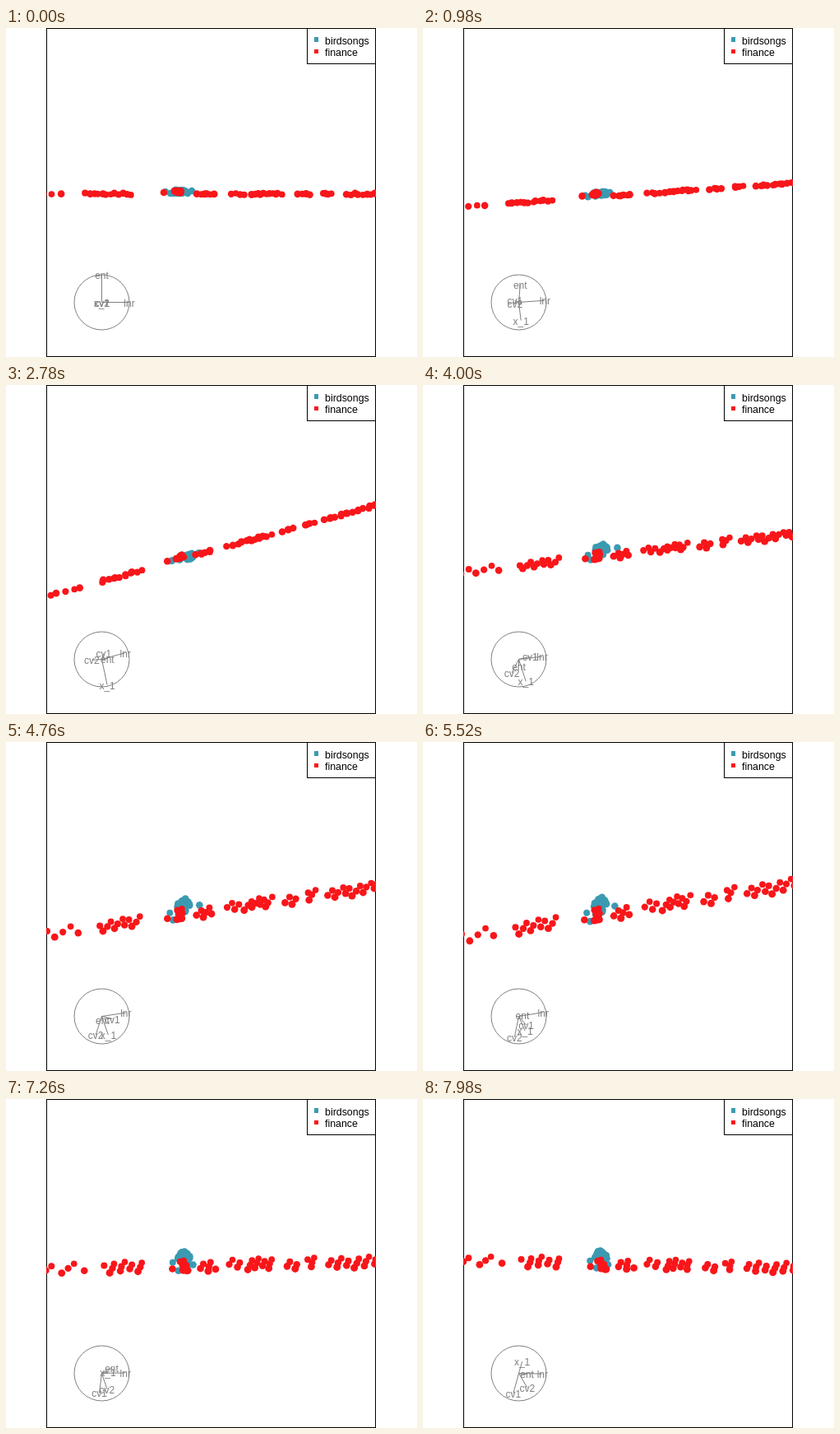
An HTML page with a canvas that plays this animation: 500 px wide and 400 px high, repeating every 8 s.

```html
<!DOCTYPE html>
<html lang="en">
<head>
<meta charset="utf-8">
<title>Projection tour</title>
<style>
  html, body { margin: 0; width: 100%; height: 100%; overflow: hidden; background: #fff; }
  canvas { display: block; }
</style>
</head>
<body>
<canvas id="stage" width="500" height="400"></canvas>
<script>
const ctx = document.getElementById('stage').getContext('2d');
const LOOP = 8000, STEP = 20;
const BLUE = '#3b9ab2', RED = '#f8161a', GREY = '#7f7f7f';
const FONT = '"Liberation Sans", Arial, sans-serif';
const LABELS = ['lnr', 'ent', 'x_1', 'cv1', 'cv2'];

// Evenly timed key projections: the horizontal and the vertical direction in LABELS order.
const POSES = [
  { h: [1, 0, 0, 0, 0], v: [0, 1, 0, 0, 0] },
  { h: [.93, .08, .11, -.16, -.19], v: [.1, .5, -.85, .09, -.04] },
  { h: [.86, .21, .19, .04, -.36], v: [.24, .06, -.93, .21, 0] },
  { h: [.85, 0, .26, .41, -.25], v: [.1, -.24, -.8, .09, -.49] },
  { h: [.89, .1, .22, .3, -.18], v: [.15, -.01, -.56, -.26, -.75] },
  { h: [.86, .37, .29, .03, .07], v: [.06, .31, -.3, -.64, -.62] },
  { h: [.86, .3, .12, -.2, .31], v: [-.02, -.03, .43, -.73, -.52] }
];

// Stretches of the red line: start, end, number of points.
const STRETCHES = [
  [-237, -183, 6], [-153, -98, 12], [-17, 3, 6], [24, 40, 4],
  [49, 85, 11], [105, 120, 4], [135, 145, 4], [164, 238, 16]
];

let seed = 11;
function random(low, high) {
  seed = (seed * 16807) % 2147483647;
  return low + (high - low) * seed / 2147483647;
}

const points = [];
function addPoint(color, radius, lnr, cv2, ent, x1, cv1 = -4 + cv2 / 4) {
  points.push({ color, radius, values: [lnr, ent, x1, cv1, cv2] });
}

// Blue group: an arch, its filling, and three outliers.
for (let i = 0; i <= 13; i++) {
  const u = i / 13;
  addPoint(BLUE, 4.3, -46 + 17 * u, -6 - 10 * Math.sin(Math.PI * u), random(-1, 4), random(-5, 3));
}
for (let i = 0; i < 10; i++) {
  addPoint(BLUE, 4.3, random(-46, -34), random(-9, 8), random(-1, 3), random(-3, 3));
}
addPoint(BLUE, 4, -56, 1, 1, 0);
addPoint(BLUE, 4.3, -50, 14, -1, 1);
addPoint(BLUE, 4.3, -24, -10, 2, 1, 10);

// Red points: the long line, its depth spread by the golden ratio, and a dense cluster.
const redRadius = cv2 => 3.9 + cv2 * .04;
let index = 0;
for (const [from, to, count] of STRETCHES) {
  for (let i = 0; i < count; i++) {
    const cv2 = -3 + 19 * (++index * .618 % 1);
    const lnr = from + (to - from) * i / (count - 1) + random(-1, 1);
    addPoint(RED, redRadius(cv2), lnr, cv2, random(-3, -.6), random(1, 3));
  }
}
for (let i = 0; i < 15; i++) {
  const cv2 = random(-2, 15);
  addPoint(RED, redRadius(cv2), random(-46, -33), cv2, random(-.5, 2.5), random(-4, 1));
}
addPoint(RED, 4.3, -58, 11, 0, 0);

// Uniform Catmull-Rom curve through p1 and p2.
function spline(p0, p1, p2, p3, u) {
  return p1 + u / 2 * (p2 - p0 + u * (2 * p0 - 5 * p1 + 4 * p2 - p3 + u * (3 * (p1 - p2) + p3 - p0)));
}

function basisAt(time) {
  const last = POSES.length - 1;
  const position = time / LOOP * last, i = Math.floor(position);
  const around = [i - 1, i, i + 1, i + 2].map(k => POSES[Math.max(0, Math.min(last, k))]);
  const blend = side => LABELS.map((_, k) => spline(...around.map(pose => pose[side][k]), position - i));
  return { h: blend('h'), v: blend('v') };
}

function text(label, x, y, size, color, align) {
  ctx.font = `${size}px ${FONT}`;
  ctx.textAlign = align;
  ctx.fillStyle = color;
  ctx.fillText(label, x, y);
}

function drawLegend() {
  ctx.strokeStyle = '#000';
  ctx.strokeRect(366.5, .5, 83, 43);
  ctx.fillStyle = BLUE;
  ctx.fillRect(375, 11, 5, 6);
  ctx.fillStyle = RED;
  ctx.fillRect(375, 26, 5, 5);
  text('birdsongs', 388, 20, 12.4, '#000', 'left');
  text('finance', 388, 34, 12.4, '#000', 'left');
}

function drawAxes({ h, v }) {
  const cx = 116.5, cy = 333.5, r = 33.5;
  ctx.strokeStyle = GREY;
  ctx.beginPath();
  ctx.arc(cx, cy, r, 0, 2 * Math.PI);
  LABELS.forEach((label, k) => {
    const x = cx + r * h[k], y = cy - r * v[k];
    ctx.moveTo(cx, cy);
    ctx.lineTo(x, y);
    text(label, x, Math.round(y + 5), 12, GREY, 'center');
  });
  ctx.stroke();
}

function drawPoints({ h, v }) {
  const dot = (a, b) => a.reduce((sum, value, k) => sum + value * b[k], 0);
  ctx.save();
  ctx.beginPath();
  ctx.rect(49, 0, 401, 400);
  ctx.clip();
  for (const { values, radius, color } of points) {
    ctx.fillStyle = color;
    ctx.beginPath();
    ctx.arc(250 + dot(values, h), 200 - dot(values, v), radius, 0, 2 * Math.PI);
    ctx.fill();
  }
  ctx.restore();
}

function draw(elapsed) {
  const basis = basisAt(Math.floor(elapsed % LOOP / STEP) * STEP);
  ctx.fillStyle = '#fff';
  ctx.fillRect(0, 0, 500, 400);
  ctx.strokeStyle = '#000';
  ctx.strokeRect(49.5, .5, 400, 399);
  drawLegend();
  drawAxes(basis);
  drawPoints(basis);
}

const start = performance.now();
function tick() {
  draw(performance.now() - start);
  requestAnimationFrame(tick);
}
tick();
</script>
</body>
</html>
```
